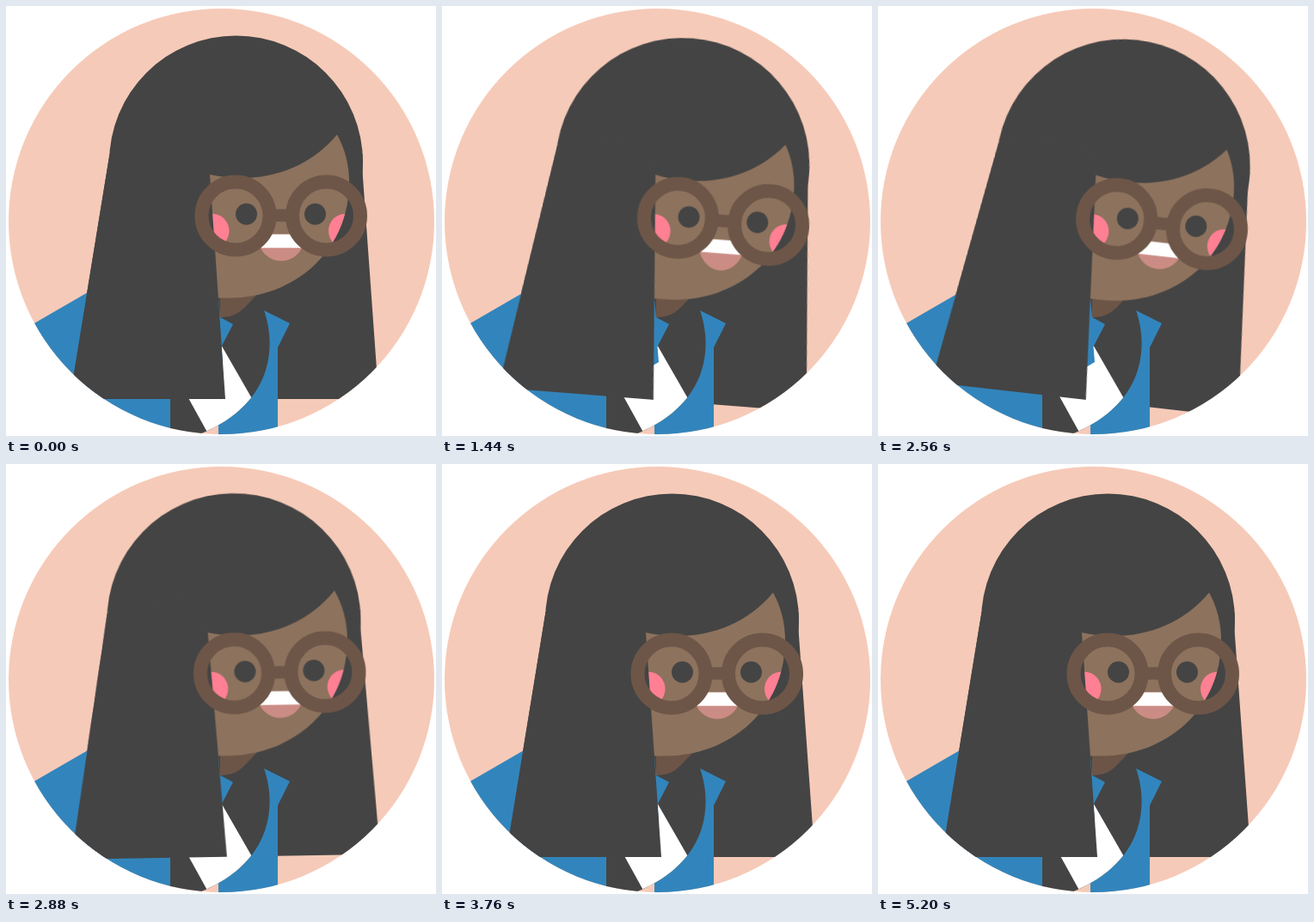
These frames come from a looping animation (500x500 px, 5760 ms). An HTML page without scripts:

```html
<!DOCTYPE html>
<html lang="en">
<head>
<meta charset="utf-8">
<title>Nodding portrait</title>
<style>
  html, body { margin: 0; width: 100%; height: 100%; overflow: hidden; background: #fff; }
  svg { display: block; width: 100%; height: 100%; }

  .hair { fill: #444; }
  .skin { fill: #8d725d; }
  .blue { fill: #3285bc; }
  .cheek { fill: #ff7f93; }
  .glasses { fill: none; stroke: #6d5648; stroke-width: 16; }

  .head { transform-origin: 240px 340px; animation: tilt 5760ms infinite; }
  .mouth { ry: 26.5px; animation: smile 5760ms ease-in-out infinite; }
  .eye { fill: #444; width: 25px; height: 25px; y: 229.5px; rx: 12.5px; animation: blink 5760ms linear infinite; }
  .eye.wink { animation-name: wink; }

  @keyframes tilt {
    0%, 17.71% { transform: rotate(0deg); animation-timing-function: ease-in-out; }
    30.21% { transform: rotate(6.95deg); animation-timing-function: linear; }
    42.36% { transform: rotate(7.1deg); animation-timing-function: cubic-bezier(.5, 0, .6, 1); }
    52.43% { transform: rotate(-2.2deg); animation-timing-function: ease-in-out; }
    58.68%, 75.69% { transform: rotate(0deg); animation-timing-function: ease-in-out; }
    84.03% { transform: rotate(3.6deg); animation-timing-function: ease-in-out; }
    90.28%, 100% { transform: rotate(0deg); }
  }
  @keyframes smile {
    0%, 17.71%, 45%, 100% { ry: 26.5px; }
    28.5%, 38.2% { ry: 32.5px; }
  }
  @keyframes blink {
    0%, 5.56%, 59.72%, 65.28%, 100% { y: 229.5px; height: 25px; rx: 12.5px; }
    2.78%, 62.5% { y: 238.2px; height: 7.6px; rx: 3.8px; }
  }
  @keyframes wink {
    0%, 5.56%, 59.72%, 65.28%, 75.69%, 88.89%, 100% { y: 229.5px; height: 25px; rx: 12.5px; }
    2.78%, 62.5%, 79.17%, 85.42% { y: 238.2px; height: 7.6px; rx: 3.8px; }
  }
</style>
</head>
<body>
<svg viewBox="0 0 500 500">
  <defs>
    <path id="face" d="M225 190 L237 196 C290 208 348 194 385 149.500 Q399 175 399 205 C399 286 334 339.500 260 339.500 H225 Z"/>
    <path id="top" d="M191 510 V300 H285 L300 354 C315 397 310 464 225 498 Z"/>
    <clipPath id="stage"><circle cx="250.500" cy="250.500" r="247.500"/></clipPath>
    <clipPath id="inTop"><use href="#top"/></clipPath>
    <clipPath id="inFace"><use href="#face"/></clipPath>
    <clipPath id="lips"><rect x="290" y="265.500" width="60" height="50"/></clipPath>
    <clipPath id="teeth"><rect x="290" y="265.500" width="60" height="15.800"/></clipPath>
  </defs>

  <g clip-path="url(#stage)">
    <rect width="500" height="500" fill="#f6cab8"/>

    <g class="head hair">
      <circle cx="267.500" cy="182" r="147.500"/>
      <path d="M74 457 L120.500 172 H414.600 V194 L433.500 457 Z"/>
    </g>

    <!-- body -->
    <path class="blue" d="M300 354 L330 369 L316 397 V500 H247 V400 Z"/>
    <use href="#top" class="hair"/>
    <path fill="#fff" d="M226 352 L311 500 V510 H242 L184 405 Z" clip-path="url(#inTop)"/>
    <path fill="#6c5547" d="M300 327 L277 351 Q265 363 249 362 V300 Z"/>
    <path class="blue" d="M0 388 L120 318.500 H245 L249 362 L264 370 L250.500 396 L252 414 L191 450 V500 H0 Z"/>

    <g class="head">
      <use href="#face" class="skin"/>
      <g class="cheek" clip-path="url(#inFace)">
        <circle cx="239.500" cy="261.500" r="20"/>
        <circle cx="395" cy="261.500" r="20"/>
      </g>
      <g clip-path="url(#lips)"><ellipse class="mouth" cx="320" cy="270" rx="26.500" fill="#cb8c85"/></g>
      <g clip-path="url(#teeth)"><ellipse class="mouth" cx="320" cy="270" rx="26.500" fill="#fff"/></g>
      <rect class="eye" x="267"/>
      <rect class="eye wink" x="347"/>
      <path class="hair" d="M74 457 L120.500 172 L215 150 L237 196 L255 457 Z"/>
      <g class="glasses">
        <circle cx="267" cy="244" r="39.500"/>
        <circle cx="372.500" cy="244" r="39.500"/>
        <path d="M306 243.500 H334" stroke-width="14.500"/>
      </g>
    </g>
  </g>
</svg>
</body>
</html>
```
